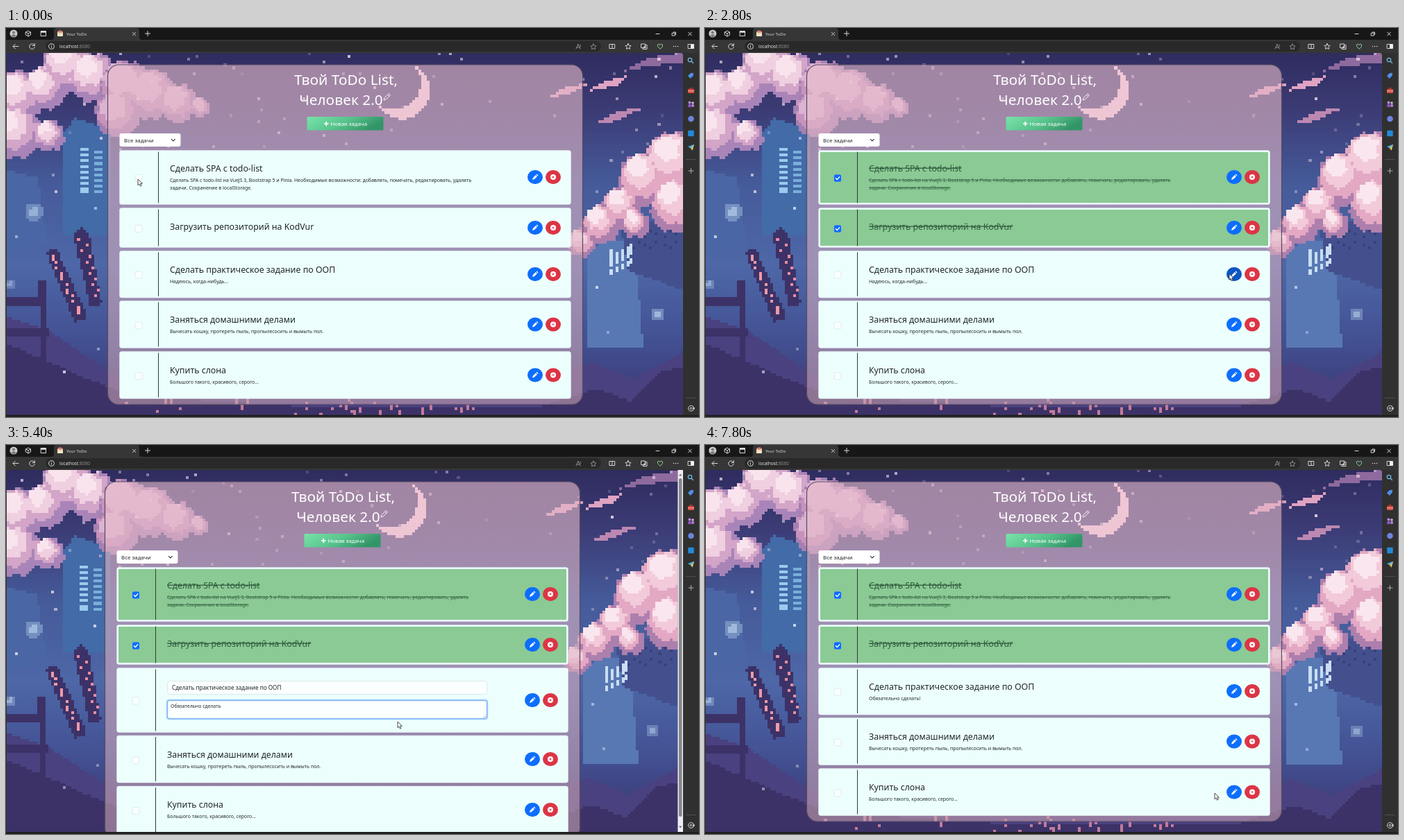
An HTML page with a canvas that plays this animation: 998 by 561 pixels, repeating every 8000 ms.

```html
<!DOCTYPE html>
<html lang="ru">
<head>
<meta charset="utf-8">
<title>Your ToDo</title>
<style>
html, body { margin: 0; width: 100%; height: 100%; overflow: hidden; background: #2d2d2e; }
#view { position: absolute; left: 1px; top: 36px; width: 974px; height: 522px; overflow: hidden; border-radius: 4px; background: #4a5a9c; }
#sky { position: absolute; left: 0; top: -13px; width: 974px; height: 548px; transform-origin: 0 50%; image-rendering: pixelated; }
svg { position: absolute; left: 0; top: 0; display: block; }
text { font-family: "Noto Sans", "Open Sans", sans-serif; white-space: pre; }
.ui { font-family: "Open Sans", "Noto Sans", sans-serif; }
.head { font-size: 20.8px; fill: #fff; text-anchor: middle; }
.title { font-size: 12.3px; fill: #212529; }
.desc { font-size: 6.9px; fill: #212529; }
.done .title, .done .desc { fill: #2f5a3d; text-decoration: line-through; }
.green, .tick { display: none; }
.done .green, .done .tick { display: inline; }
.ico { fill: none; stroke: #d6d6d6; stroke-width: 1; stroke-linecap: round; stroke-linejoin: round; }
</style>
</head>
<body>
<div id="view"><canvas id="sky" width="240" height="135"></canvas></div>
<svg id="stage" width="998" height="561" viewBox="0 0 998 561"></svg>
<script>
const $ = id => document.getElementById(id);
const STEP = 200, LOOP = 8000, COLS = 240, ROWS = 135, CELL = 974 / COLS;
const clamp = (v, a, b) => Math.max(a, Math.min(b, v));
const mix = (a, b, k) => a + (b - a) * k;

function random(seed) {
  return () => {
    seed = (seed * 16807) % 2147483647;
    return seed / 2147483647;
  };
}

// ---- pixel landscape, laid out in stage coordinates ----
const land = document.createElement('canvas');
land.width = COLS;
land.height = ROWS;
const ink = land.getContext('2d');
const col = x => Math.round((x - 1) / CELL);
const row = y => Math.round((y - 23) / CELL);

function fill(color, inside) {
  ink.fillStyle = color;
  for (let j = 0; j < ROWS; j++)
    for (let i = 0; i < COLS; i++)
      if (inside(1 + (i + .5) * CELL, 23 + (j + .5) * CELL)) ink.fillRect(i, j, 1, 1);
}

function box(ctx, color, x, y, w = 4, h = 4) {
  ctx.fillStyle = color;
  ctx.fillRect(col(x), row(y), Math.max(1, Math.round(w / CELL)), Math.max(1, Math.round(h / CELL)));
}

function poly(color, pts) {
  fill(color, (x, y) => {
    let hit = false;
    pts.forEach(([ax, ay], i) => {
      const [bx, by] = pts[(i + 1) % pts.length];
      if (ay > y !== by > y && x < ax + (y - ay) * (bx - ax) / (by - ay)) hit = !hit;
    });
    return hit;
  });
}

function cloud(puffs, tones) {
  tones.forEach((tone, n) => fill(tone, (x, y) => puffs.some(([px, py, r]) => {
    const wob = 2.5 * Math.sin(x * .31 + n) * Math.cos(y * .27);
    return Math.hypot(x - px + n * r * .1, y - py + n * r * .16) < r * (1 - n * .2) + wob;
  })));
}

function paintLand() {
  const rnd = random(77);
  const stops = [[23, 45, 42, 92], [120, 60, 60, 118], [220, 69, 90, 153], [340, 78, 103, 167], [450, 66, 80, 146], [571, 58, 50, 105]];
  for (let j = 0; j < ROWS; j++) {
    const y = 23 + j * CELL;
    let k = 0;
    while (k < stops.length - 2 && stops[k + 1][0] < y) k++;
    const a = stops[k], b = stops[k + 1], q = (y - a[0]) / (b[0] - a[0]);
    const rgb = [1, 2, 3].map(c => Math.round(mix(a[c], b[c], q)));
    ink.fillStyle = `rgb(${rgb})`;
    ink.fillRect(0, j, COLS, 1);
  }
  // crescent
  fill('#f8d5e2', (x, y) => Math.hypot(x - 570, y - 90) < 41 && Math.hypot(x - 557, y - 78) > 40);
  // distant blocks
  poly('#426ba8', [[84, 150], [100, 130], [124, 138], [150, 150], [150, 300], [84, 300]]);
  poly('#4b66a5', [[0, 205], [45, 215], [60, 310], [0, 330]]);
  poly('#5878b3', [[838, 330], [862, 302], [905, 312], [918, 460], [838, 460]]);
  poly('#44508e', [[886, 292], [922, 276], [975, 288], [975, 378], [896, 350]]);
  for (let k = 0; k < 9; k++) {
    box(ink, '#9acbee', 106, 172 + k * 8, 12, 4);
    if (k < 8) box(ink, '#79afd9', 128, 178 + k * 8, 12, 4);
  }
  for (let k = 0; k < 16; k++) {
    box(ink, '#c8def3', 871 + (k % 5) * 7, 346 - (k % 5) * 4 - (k / 5 | 0) * 9, 4, 8);
    box(ink, '#38417c', 900 + (k % 8) * 9, 292 + (k / 8 | 0) * 17 + k % 3 * 3, 5, 4);
  }
  // clouds
  const pale = ['#a984b8', '#d3a5c8', '#efcfe0', '#f9e4ee'];
  cloud([[90, 55, 38], [126, 72, 36], [55, 88, 31], [18, 100, 38], [15, 151, 37], [62, 155, 23]], pale);
  cloud([[172, 86, 38], [210, 96, 36], [248, 109, 27], [281, 114, 14], [160, 125, 32]], ['#a580b1', '#c793bd', '#dcb3d1']);
  cloud([[965, 196, 46], [921, 219, 39], [968, 257, 39], [887, 258, 28], [857, 283, 27], [829, 310, 20], [907, 282, 20]], ['#ad7fad', '#e3a8c3', '#f2cad9', '#fae6ee']);
  poly('#d89bbb', [[778, 101], [805, 86], [842, 78], [812, 95]]);
  poly('#dfa3c2', [[836, 92], [861, 77], [898, 67], [879, 83]]);
  poly('#8e6a9e', [[890, 62], [925, 43], [978, 35], [978, 52], [930, 54]]);
  poly('#bc88b1', [[848, 138], [886, 119], [918, 116], [878, 134]]);
  // foreground
  const dark = '#3c3268';
  poly('#4a4180', [[0, 415], [60, 435], [155, 500], [400, 525], [700, 530], [845, 482], [905, 506], [978, 464], [978, 575], [0, 575]]);
  poly(dark, [[0, 455], [55, 478], [115, 505], [180, 530], [420, 545], [760, 548], [850, 520], [900, 539], [942, 495], [978, 488], [978, 575], [0, 575]]);
  poly(dark, [[0, 390], [47, 390], [47, 365], [59, 365], [59, 485], [48, 485], [48, 402], [0, 402]]);
  poly(dark, [[0, 434], [60, 434], [60, 444], [0, 444]]);
  poly(dark, [[57, 322], [73, 318], [118, 418], [99, 424]]);
  poly(dark, [[97, 298], [108, 287], [120, 300], [138, 398], [121, 401]]);
  for (let k = 0; k < 11; k++) {
    box(ink, '#ed9aa7', 64 + k * 4 + k % 2 * 4, 329 + k * 8, 4, k % 3 ? 4 : 8);
    box(ink, '#e88d9f', 104 + k * 2.2 + k % 2 * 8, 303 + k * 8, 4, 4);
  }
  for (let k = 0; k < 34; k++) {
    const x = 170 + rnd() * 500;
    box(ink, '#c27b99', x, 535 + rnd() * 20, 4, rnd() > .5 ? 8 : 4);
  }
}

const rndStar = random(2024);
const stars = Array.from({ length: 82 }, () => ({
  x: 5 + rndStar() * 965, y: 36 + rndStar() ** 1.5 * 205, phase: rndStar() * 6.3, light: .35 + rndStar() * .5
}));
const orbs = [[38, 263, 13], [938, 412, 10], [5, 366, 8]];
const motes = [[125, 258], [81, 494], [866, 438], [14, 299], [850, 371], [130, 463]];
const sky = $('sky').getContext('2d');

function paintSky(t) {
  sky.globalAlpha = 1;
  sky.drawImage(land, 0, 0);
  const beat = t / 1200 * Math.PI;
  for (const s of stars) {
    sky.globalAlpha = s.light * (.65 + .35 * Math.sin(beat + s.phase));
    box(sky, '#f3dfef', s.x, s.y);
  }
  for (const [x, y, r] of orbs) {
    for (let dy = -r; dy <= r; dy += CELL)
      for (let dx = -r; dx <= r; dx += CELL) {
        const d = Math.hypot(dx, dy) / r;
        if (d > 1) continue;
        sky.globalAlpha = (d < .5 ? .8 : .4) * (.85 + .15 * Math.sin(beat + x));
        box(sky, '#b7d0eb', x + dx, y + dy);
      }
  }
  motes.forEach(([x, y], i) => {
    sky.globalAlpha = .65 + .25 * Math.sin(beat + i * 2);
    box(sky, '#d5def2', x, y, i < 3 ? 5 : 4, 5);
  });
}

// ---- page ----
const rect = (x, y, w, h, fill, more = '') => `<rect x="${x}" y="${y}" width="${w}" height="${h}" fill="${fill}" ${more}/>`;
const text = (cls, x, y, s, more = '') => `<text class="${cls}" x="${x}" y="${y}" ${more}>${s}</text>`;
const icon = (x, y, d, more = '') => `<path class="ico" transform="translate(${x} ${y})" d="${d}" ${more}/>`;
const disc = (x, y, r, color) => `<circle cx="${x}" cy="${y}" r="${r}" fill="${color}"/>`;

const card = (y, h) => rect(163.5, y, 650, h, '#ecfffd', 'rx="3" stroke="#dcecea" stroke-width=".5"');
const divider = (y, h) => `<path d="M219.5 ${y + 2}v${h - 4}" stroke="#30393a"/>`;

function checkbox(y, id) {
  return rect(185, y - 6, 12, 12, 'none', `id="ring${id}" rx="3.5" stroke="#9cc3f8" stroke-width="3" visibility="hidden"`) +
    rect(186, y - 5, 10, 10, '#f9ffff', 'rx="2.5" stroke="#dbe5e6" stroke-width=".8"') +
    `<g class="tick">${rect(185.8, y - 5.2, 10.4, 10.4, '#0d6efd', 'rx="2.5"')}
    <path d="M188.4 ${y + .2}l1.9 1.9 3.4-3.8" fill="none" stroke="#fff" stroke-width="1.4" stroke-linecap="round"/></g>`;
}

function buttons(y, id) {
  return rect(751, y - 10, 22, 20, '#0d6efd', `id="pen${id}" rx="10.5"`) +
    `<path transform="translate(762 ${y})" d="M-4 4l.9-3 3.9-3.9 2.1 2.1-3.9 3.9zM1.5-3.6l1.1-.9 1.9 1.9-.9 1.1z" fill="#fff"/>` +
    rect(777, y - 10, 22, 20, '#dc3545', 'rx="10.5"') + disc(788, y, 4, '#fff') +
    `<path d="M786.6 ${y - 1.4}l2.8 2.8m0-2.8l-2.8 2.8" stroke="#dc3545"/>`;
}

const tasks = [
  { y: 176.5, h: 78, title: 'Сделать SPA с todo-list', base: 206.5, check: 216.5, btn: 215,
    lines: ['Сделать SPA с todo-list на VueJS 3, Bootstrap 5 и Pinia. Необходимые возможности: добавлять, помечать, редактировать, удалять',
      'задачи. Сохранение в localStorage.'] },
  { y: 259.5, h: 57, title: 'Загрузить репозиторий на KodVur', base: 290.5, check: 289.5, btn: 288, lines: [] },
  { y: 321.5, h: 67.5, title: 'Сделать практическое задание по ООП', base: 352.5, check: 356, btn: 355, lines: ['Надеюсь, когда-нибудь...'] },
  { y: 393.5, h: 68, title: 'Заняться домашними делами', base: 425, check: 429, btn: 427.5, lines: ['Вычесать кошку, протереть пыль, пропылесосить и вымыть пол.'] },
  { y: 466.5, h: 68, title: 'Купить слона', base: 497.5, check: 502, btn: 500.5, lines: ['Большого такого, красивого, серого...'] }
];

const taskRow = (k, i) => `<g id="task${i}">${card(k.y, k.h)}
  ${rect(166, k.y + 2.5, 645, k.h - 5, '#8bca94', 'class="green"')}
  ${divider(k.y, k.h)}${checkbox(k.check, i)}${text('title', 236, k.base, k.title)}
  ${k.lines.map((s, n) => text('desc', 236, k.base + 15 + n * 11, s, `id="desc${i}${n}"`)).join('')}
  ${buttons(k.btn, i)}</g>`;

const editor = `<g id="editor">${card(321.5, 93)}${divider(321.5, 93)}${checkbox(369, 'E')}
  ${rect(236.5, 340.5, 460, 19, '#fbffff', 'rx="3" stroke="#d9e3e5" stroke-width=".8"')}
  ${text('title', 243, 353, tasks[2].title, 'style="font-size:8.15px"')}
  ${rect(236, 368, 461, 27, '#fbffff', 'rx="3" stroke="#9fc8fb" stroke-width="2.5"')}
  ${rect(236.5, 368.5, 460, 26, 'none', 'rx="3" stroke="#79b0f4" stroke-width=".6"')}
  <path d="M691 393.5l4-4m-2 4l2-2" stroke="#8b9393" stroke-width=".6"/>
  ${rect(241, 371, 88, 11, '#2f67c9', 'id="mark"')}
  ${text('desc', 241, 379.3, '', 'id="typed"')}${buttons(368, 'E')}</g>`;

const page = `<g clip-path="url(#clip)"><g id="page">
  ${rect(146.5, 53, 684, 490, 'url(#glass)', 'id="panel" rx="16" stroke="#574b62" stroke-width="1.2"')}
  ${text('head', 489.5, 82, 'Твой ToDo List,')}${text('head', 482.5, 111, 'Человек 2.0')}
  <path d="M544 104l1-3.2 6.2-6.2 2.2 2.2-6.2 6.2zM549.6 96.2l2.2 2.2" fill="none" stroke="#fff" stroke-width=".9"/>
  ${rect(433.5, 128, 110, 19.5, 'url(#mint)', 'rx="1.5"')}
  <path d="M458 138h6.6m-3.3-3.3v6.6" stroke="#fff" stroke-width="1.7"/>
  ${text('desc', 467.5, 141, 'Новая задача', 'style="font-size:7.9px;fill:#fff"')}
  ${rect(163.5, 152, 88, 19, '#fff', 'rx="3"')}
  ${text('desc', 170, 164.5, 'Все задачи', 'style="font-size:7.9px"')}
  <path d="M238 160.2l2.8 2.8 2.8-2.8" fill="none" stroke="#343a40" stroke-width="1.2"/>
  ${tasks.slice(0, 3).map(taskRow).join('')}${editor}
  <g id="rest">${tasks.slice(3).map((k, i) => taskRow(k, i + 3)).join('')}</g></g></g>
  <g id="bar">${rect(967.5, 36, 7.5, 522, '#eeeef0')}${rect(969, 48, 4.5, 488, '#85858a', 'rx="2.2"')}
  <path d="M968.8 44.5l2.4-3 2.4 3zM968.8 549.5l2.4 3 2.4-3z" fill="#77777b"/></g>`;

// ---- browser frame ----
const ring = 'M-4 0a4 4 0 1 0 8 0a4 4 0 1 0-8 0';
const star = 'M0-4l1.2 2.6 2.8.4-2 2 .5 2.8L0 2.5l-2.5 1.3.5-2.8-2-2 2.8-.4z';
const plus = 'M-3.5 0h7M0-3.5v7';
const faint = 'style="stroke:#8b8b8b"';
const frame = rect(0, 0, 998, 17, '#171717') +
  `<path d="M65 17q4 0 4-4V4q0-4 4-4h115q4 0 4 4v9q0 4 4 4z" fill="#363636"/>` +
  rect(0, 17, 998, 19, '#363636') + rect(57, 19, 800, 15, '#292929', 'rx="7.5"') +
  rect(975, 36, 23, 525, '#303030') + rect(0, 558, 998, 3, '#202020') + rect(0, 36, 1, 522, '#303030') +
  disc(11, 8, 5.5, '#c9c9c9') + disc(11, 6.5, 2, '#777') + '<path d="M7.4 11.3q3.6-4 7.2 0q-3.6 3.4-7.2 0" fill="#777"/>' +
  icon(32, 8, 'M-3.5-2L0-4 3.5-2v4L0 4-3.5 2zM-3.5-2L0 0l3.5-2M0 0v4') +
  icon(54, 8, 'M-3.5-3.5h7v7h-7zM-3.5-2h7') + rect(50.5, 4.5, 7, 2, '#e2e2e2') +
  rect(74, 5, 8, 7, '#e9cda4', 'rx="1"') + rect(75.5, 3.5, 5, 3, '#db7772') + rect(74, 8, 8, 4, '#f3e4c8', 'rx="1"') +
  text('ui', 87, 10.5, 'Your ToDo', 'font-size="6.1" fill="#e6e6e6"') +
  icon(184.5, 8.5, 'M-2-2l4 4m0-4l-4 4') + icon(204, 8, plus) +
  icon(938.5, 8.5, 'M-2.5 0h5') + icon(962, 8.5, 'M-2.5-1.2h3.7v3.7h-3.7zM-1-2.5h3.5V1') + icon(985, 8.5, 'M-2.4-2.4l4.8 4.8m0-4.8l-4.8 4.8') +
  icon(14, 26.5, 'M4 0h-8l3.3-3.3M-4 0l3.3 3.3') + icon(37.5, 26.5, 'M3.6-1.2a3.8 3.8 0 1 0 .2 2.2M3.8-4v3h-3') +
  icon(65.5, 26.5, ring) + icon(65.5, 26.5, 'M0-.3v2M0-2v.1') +
  `<text class="ui" x="77" y="29" font-size="6.5" fill="#eee">localhost<tspan fill="#919191">:8080</tspan></text>` +
  icon(824, 27, 'M-3 3L0-4l3 7M-2 1h4M3-3q1.5 1 0 3', faint) + icon(846, 27, star, faint) +
  icon(873, 26.5, 'M-3.7-3h7.4v6h-7.4zM0-3v6') + icon(896, 26.5, star) +
  icon(919, 26.5, 'M-4-3.5h5.5V2H-4zM-2 2v2h6v-6H1.5M1-.5v3M-.5 1h3') +
  icon(942, 26.5, 'M0 3.5L-3.5 0q-1-3 1.5-3.5L0-2l2-1.5Q4.5-3 3.5 0z', 'style="stroke:#8fcf9b"') +
  [961.5, 964.5, 967.5].map(x => disc(x, 26.5, .8, '#d6d6d6')).join('') +
  icon(986.5, 26.5, 'M-4-3h8v6h-8z') + rect(986, 23.5, 4.5, 6, '#f1f1f1') +
  icon(985.5, 46.5, 'M-3.2-.5a2.7 2.7 0 1 0 5.4 0a2.7 2.7 0 1 0-5.4 0M1.5 1.5L4 4', 'style="stroke:#72b7e2;stroke-width:1.3"') +
  '<path d="M982 69l4-4 4-.3-.2 4-4.2 4.2z" fill="#4d8fe8"/>' +
  rect(982, 88, 9, 6, '#d44b43', 'rx="1"') + rect(984.5, 86, 4, 2.5, '#a93631') + rect(982, 90.3, 9, 1, '#f4b7a8') +
  disc(984.5, 107.5, 2, '#b48be4') + rect(982.2, 109.8, 4.6, 4.5, '#8953c6', 'rx="1.5"') + disc(989, 108, 1.7, '#d9b5e9') + rect(987.2, 110, 3.8, 4, '#b57bcf', 'rx="1.4"') +
  disc(986.5, 131, 4.3, '#6c83df') + rect(982.2, 147.8, 8.5, 8.5, '#2389d7', 'rx="1"') +
  '<path d="M982 171l9-3.3-2.4 8.7-2.6-3z" fill="#45b6e4"/><path d="M986 173.4l5-5.7-2.4 8.7z" fill="#f0b94b"/>' +
  rect(979, 189, 15, .8, '#555') + icon(986.5, 206, plus, 'style="stroke:#aaa"') + rect(979, 533, 15, .8, '#555') +
  icon(986.5, 548.5, ring) + icon(986.5, 548.5, 'M-1.4 0a1.4 1.4 0 1 0 2.8 0a1.4 1.4 0 1 0-2.8 0') +
  [0, 60, 120, 180, 240, 300].map(a => icon(986.5, 548.5, 'M4-.5v1', `style="stroke-width:1.5" transform-origin="0 0" rotate="${a}"`)).join('');

const shades = `<defs><clipPath id="clip">${rect(1, 36, 974, 522, '#000')}</clipPath>
  <linearGradient id="glass" x2="0" y2="1"><stop stop-color="#ebbecd" stop-opacity=".6"/><stop offset="1" stop-color="#cda6b5" stop-opacity=".56"/></linearGradient>
  <linearGradient id="mint" y2=".3"><stop stop-color="#78e3aa"/><stop offset=".55" stop-color="#58c38c"/><stop offset="1" stop-color="#329567"/></linearGradient></defs>`;

$('stage').innerHTML = shades + page + frame +
  '<path id="cursor" d="M0 0v8.7l2-1.8 1.5 3.2 1.6-.7-1.4-3.1h2.6z" fill="#fff" stroke="#222" stroke-width=".8"/>';

// ---- timeline ----
const route = [[0, 190, 218], [400, 190, 218], [800, 189, 270], [1000, 188.5, 288.5], [1400, 189, 289], [2400, 680, 345],
  [2600, 754, 354], [3000, 756, 355], [3200, 600, 375], [3600, 237, 377], [4000, 564, 399], [5600, 564, 399],
  [6000, 757, 368], [6600, 757, 377], [7200, 757, 400], [7800, 734, 502], [8000, 734, 502]];
const answer = 'Обязательно сделать!';

function pointer(t) {
  const k = route.findIndex(p => p[0] > t);
  const [ta, xa, ya] = route[k - 1], [tb, xb, yb] = route[k];
  const q = (t - ta) / (tb - ta);
  return [mix(xa, xb, q), mix(ya, yb, q)];
}

const show = (id, on) => $(id).setAttribute('visibility', on ? 'visible' : 'hidden');
const within = (t, a, b) => t >= a && t < b;

function render(t) {
  const editing = within(t, 3000, 6200), typing = t >= 4200;
  paintSky(t);
  $('sky').style.transform = editing ? 'scale(.9925)' : 'none';
  $('page').setAttribute('transform', `translate(${editing ? -4 : 0} 0)`);
  $('rest').setAttribute('transform', `translate(0 ${editing ? 25.5 : 0})`);
  $('panel').setAttribute('height', editing ? 515.5 : 490);
  $('task0').setAttribute('class', t >= 400 ? 'done' : '');
  $('task1').setAttribute('class', t >= 1200 ? 'done' : '');
  show('ring0', within(t, 400, 1000));
  show('ring1', within(t, 1000, 2600));
  $('task2').style.display = editing ? 'none' : 'inline';
  $('editor').style.display = editing ? 'inline' : 'none';
  show('bar', editing);
  $('desc20').textContent = t >= 6200 ? answer : tasks[2].lines[0];
  $('typed').textContent = typing ? answer.slice(0, clamp(1 + 3 * (t - 4200) / STEP, 0, answer.length)) : tasks[2].lines[0];
  const marked = within(t, 3800, 4200);
  $('mark').style.display = marked ? 'inline' : 'none';
  $('typed').style.fill = marked ? '#fff' : '#212529';
  $('pen2').setAttribute('fill', within(t, 2600, 3000) ? '#0b56c5' : '#0d6efd');
  $('penE').setAttribute('fill', within(t, 6000, 6200) ? '#0b56c5' : '#0d6efd');
  $('cursor').setAttribute('transform', `translate(${pointer(t)})`);
}

paintLand();
const start = performance.now();
let last = -1;
function tick() {
  const t = Math.floor((performance.now() - start) % LOOP / STEP) * STEP;
  if (t !== last) render(last = t);
  requestAnimationFrame(tick);
}
tick();
</script>
</body>
</html>
```
